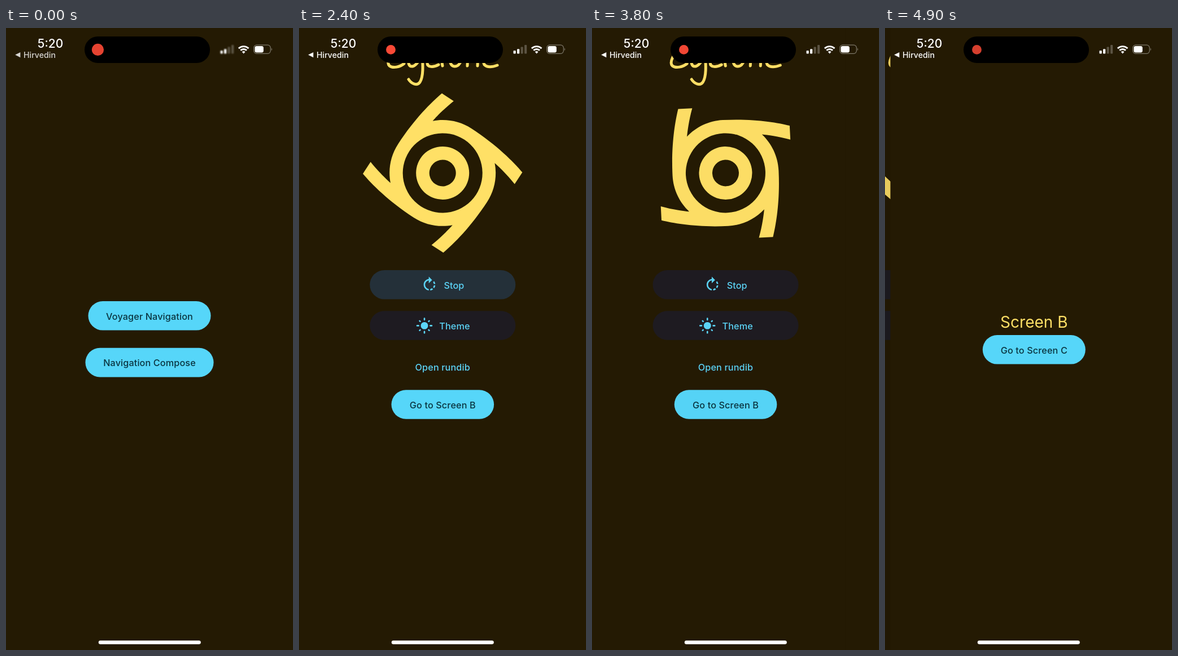
An HTML page that plays this animation: 508 px wide and 1102 px high, repeating every 5000 ms.

```html
<!DOCTYPE html>
<html lang="en">
<head>
<meta charset="utf-8">
<title>Navigation demo</title>
<style>
  html, body { margin: 0; width: 100%; height: 100%; overflow: hidden; background: #241a03; }
  svg { display: block; width: 508px; height: 1102px; font-family: Inter, "Open Sans", sans-serif; }
  .bg { fill: #241a03; }
  .label { font-size: 16.2px; font-weight: 500; letter-spacing: .13px; }
  .mid { text-anchor: middle; }
  .pill { fill: #56d6f9; }
  .on { fill: #0a3440; }
  .tonal { fill: #1e1b21; }
  .accent { fill: #5cd5f8; }
  .yellow { fill: #ffe066; }
  .ink { fill: none; stroke: #ffe066; stroke-width: 5; stroke-linecap: round; stroke-linejoin: round; }
  .press { fill: #0a3440; }
  .glow { fill: #56d6f9; }
</style>
</head>
<body>
<svg viewBox="0 0 508 1102">
  <defs>
    <path id="turn" d="M15.55 5.55L11 1v3.07C7.06 4.56 4 7.92 4 12s3.05 7.44 7 7.93v-2.02c-2.84-.48-5-2.94-5-5.91s2.16-5.43 5-5.91V10l4.55-4.45zM19.93 11c-.17-1.39-.72-2.73-1.62-3.89l-1.42 1.42c.54.75.88 1.6 1.02 2.47h2.02zM13 17.9v2.02c1.39-.17 2.74-.71 3.9-1.61l-1.44-1.44c-.75.54-1.59.89-2.46 1.03zm3.89-2.42l1.42 1.41c.9-1.16 1.45-2.5 1.62-3.89h-2.02c-.14.87-.48 1.72-1.02 2.48z" transform="scale(1.293) translate(-12 -12)"/>
  </defs>

  <g id="home">
    <rect class="bg" width="508" height="1102"/>
    <rect class="pill" x="145.5" y="484" width="217" height="51.6" rx="25.8"/>
    <rect class="press" id="pressHome" x="145.5" y="484" width="217" height="51.6" rx="25.8"/>
    <text class="label mid on" x="254" y="516.6">Voyager Navigation</text>
    <rect class="pill" x="140.5" y="566.8" width="227" height="51.6" rx="25.8"/>
    <text class="label mid on" x="254" y="599.4">Navigation Compose</text>
    <rect id="dimHome" width="508" height="1102"/>
  </g>

  <g id="screenA">
    <rect class="bg" width="508" height="1102"/>
    <g class="ink">
      <path d="M188 34C186 27 180 28 174 34C162 46 154 61 160 67C166 72 179 69 186 63"/>
      <path d="M195 48C192 62 194 69 201 68C208 66 214 56 218 46C219 62 221 85 214 96C209 103 199 99 194 91"/>
      <path d="M246 48C238 42 227 52 227 62C227 70 238 70 247 65"/>
      <path d="M258 28C254 45 252 60 254 67"/>
      <path d="M277 45C266 47 264 67 275 68C287 69 292 48 280 45"/>
      <path d="M299 47L298 67M298 58C304 44 318 42 316 67"/>
      <path d="M325 58C337 56 352 50 343 46C333 42 323 56 328 65C334 71 343 69 351 66"/>
    </g>
    <g transform="translate(254.2 256.9) scale(11.75)">
      <path id="cyclone" class="yellow" fill-rule="evenodd" d="M12 8a4 4 0 1 0 0 8a4 4 0 1 0 0-8zM12 14a2 2 0 1 1 0-4a2 2 0 1 1 0 4zM22 7.47V5.35C20.05 4.77 16.56 4 12 4C9.85 4 7.89 4.86 6.46 6.24C6.59 5.39 6.86 3.84 7.47 2H5.35C4.77 3.95 4 7.44 4 12c0 2.15.86 4.11 2.24 5.54c-.85-.14-2.4-.4-4.24-1.01v2.12C3.95 19.23 7.44 20 12 20c2.15 0 4.11-.86 5.54-2.24c-.14.85-.4 2.4-1.01 4.24h2.12C19.23 20.05 20 16.56 20 12c0-2.15-.86-4.11-2.24-5.54C18.61 6.59 20.16 6.86 22 7.47zM12 18a6 6 0 1 1 0-12a6 6 0 1 1 0 12z"/>
    </g>
    <rect class="tonal" x="125.3" y="429" width="258" height="51.6" rx="25.8"/>
    <rect class="glow" id="pressRun" x="125.3" y="429" width="258" height="51.6" rx="25.8"/>
    <g class="accent label" id="run">
      <use href="#turn" x="234" y="454.8"/><text x="259.7" y="461.6">Run</text>
    </g>
    <g class="accent label" id="stop">
      <use href="#turn" x="231" y="454.8"/><text x="256.4" y="461.6">Stop</text>
    </g>
    <rect class="tonal" x="125.3" y="501.2" width="258" height="51.6" rx="25.8"/>
    <g id="sun" class="accent" transform="translate(222 527.4) scale(1.293)" stroke="#5cd5f8" stroke-width="2" stroke-linecap="round">
      <circle r="5" stroke="none"/>
    </g>
    <text class="label accent" x="248.3" y="534">Theme</text>
    <text class="label mid accent" x="254.2" y="606.8">Open rundib</text>
    <rect class="pill" x="163.5" y="641.2" width="181.6" height="51.6" rx="25.8"/>
    <rect class="press" id="pressGo" x="163.5" y="641.2" width="181.6" height="51.6" rx="25.8"/>
    <text class="label mid on" x="254.3" y="673.8">Go to Screen B</text>
    <rect id="dimA" width="508" height="1102"/>
  </g>

  <g id="screenB">
    <rect class="bg" width="508" height="1102"/>
    <text class="mid yellow" x="254.3" y="531.4" font-size="28">Screen B</text>
    <rect class="pill" x="163.3" y="544" width="182" height="51.6" rx="25.8"/>
    <text class="label mid on" x="254.3" y="576.6">Go to Screen C</text>
  </g>

  <g fill="#fff">
    <rect x="139" y="15" width="222" height="47" rx="23.5" fill="#000"/>
    <circle id="dot" cx="162.5" cy="38.4" r="8.4" fill="#ff4b37"/>
    <text class="mid" x="78.6" y="35.4" font-size="21" font-weight="500">5:20</text>
    <g id="back">
      <path d="M16.2 47.6L25.4 43V52.2Z"/>
      <text x="31" y="52.7" font-size="14.2" font-weight="500">Hirvedin</text>
    </g>
    <g id="signal">
      <rect x="379.5" y="40" width="4.2" height="5.5" rx="1"/>
      <rect x="386" y="37.2" width="4.2" height="8.3" rx="1"/>
      <rect x="392.5" y="33.6" width="4.2" height="11.9" rx="1" opacity=".25"/>
      <rect x="399" y="30" width="4.2" height="15.5" rx="1" opacity=".25"/>
    </g>
    <g transform="translate(420.6 45.4)">
      <path d="M0 0L-2.9 -3.2A4.3 4.3 0 0 1 2.9 -3.2Z"/>
      <path d="M-5.4 -5.8A7.9 7.9 0 0 1 5.4 -5.8M-8.8 -9.3A12.8 12.8 0 0 1 8.8 -9.3" fill="none" stroke="#fff" stroke-width="2.9"/>
    </g>
    <rect x="438.6" y="30.1" width="29.6" height="15.2" rx="5" fill="none" stroke="#fff" stroke-opacity=".42" stroke-width="1.2"/>
    <rect x="440.4" y="32" width="15.4" height="11.5" rx="3.2"/>
    <path d="M469.8 35.2Q471.8 37.7 469.8 40.2Z" opacity=".5"/>
    <rect x="163.8" y="1085.2" width="181" height="6.6" rx="3.3"/>
  </g>
</svg>
<script>
  const LOOP = 5000, STEP = 100, W = 508, PARALLAX = 0.3, DIM = 0.09;
  const $ = id => document.getElementById(id);
  const clamp = v => Math.min(1, Math.max(0, v));

  // critically damped spring from 0 to 1
  const spring = (t, start, rate) => {
    const x = Math.max(0, t - start) * rate;
    return 1 - (1 + x) * Math.exp(-x);
  };
  // back swipe, 0 to 1
  const swipe = (t, start) => {
    const u = clamp((t - start) / 520);
    return u < 0.5 ? 4 * u ** 3 : 1 - 4 * (1 - u) ** 3;
  };
  const press = (t, from, to) => Math.min(clamp((t - from) / 80), clamp((to - t) / 150));

  function progressB(t) {
    if (t < 3440) return spring(t, 2952, 0.024);
    if (t < 4135) return 1 - swipe(t, 3440);
    if (t < 4813) return spring(t, 4135, 0.02);
    return 1 - swipe(t, 4813);
  }

  const moveX = (id, x) => $(id).setAttribute("transform", `translate(${x} 0)`);
  const fade = (id, a) => $(id).setAttribute("opacity", a);

  for (let i = 0; i < 8; i++) {
    const ray = document.createElementNS("http://www.w3.org/2000/svg", "path");
    ray.setAttribute("d", i % 2 ? "M8.2 0H9.3" : "M8 0H10");
    ray.setAttribute("transform", `rotate(${i * 45})`);
    $("sun").append(ray);
  }

  function draw(t) {
    const a = spring(t, 646, 0.0185), b = progressB(t);
    moveX("home", -W * PARALLAX * a);
    moveX("screenA", W * (1 - a) - W * PARALLAX * b);
    moveX("screenB", W * (1 - b));
    fade("dimHome", DIM * a);
    fade("dimA", DIM * b);

    const spinStart = 2308, spinning = t >= spinStart;
    const angle = spinning ? (t - spinStart) * 0.36 : 0;
    $("cyclone").setAttribute("transform", `rotate(${angle}) translate(-12 -12)`);
    fade("run", spinning ? 0 : 1);
    fade("stop", spinning ? 1 : 0);

    fade("pressHome", 0.11 * press(t, 560, 900));
    fade("pressRun", 0.11 * press(t, 2250, 2600));
    fade("pressGo", 0.1 * Math.max(press(t, 2870, 3100), press(t, 4040, 4230)));

    const settle = clamp(t / 300);
    $("dot").setAttribute("r", 10.6 - 2.2 * settle);
    fade("dot", 0.915 + 0.085 * Math.cos((t - 1080) / 1500 * 2 * Math.PI));
    fade("back", 0.82 + 0.18 * settle);
    $("signal").style.filter = settle < 1 ? `blur(${1.2 * (1 - settle)}px)` : "none";
  }

  const begin = performance.now();
  function tick() {
    const t = (performance.now() - begin) % LOOP;
    draw(Math.floor(t / STEP) * STEP);
    requestAnimationFrame(tick);
  }
  tick();
</script>
</body>
</html>
```
